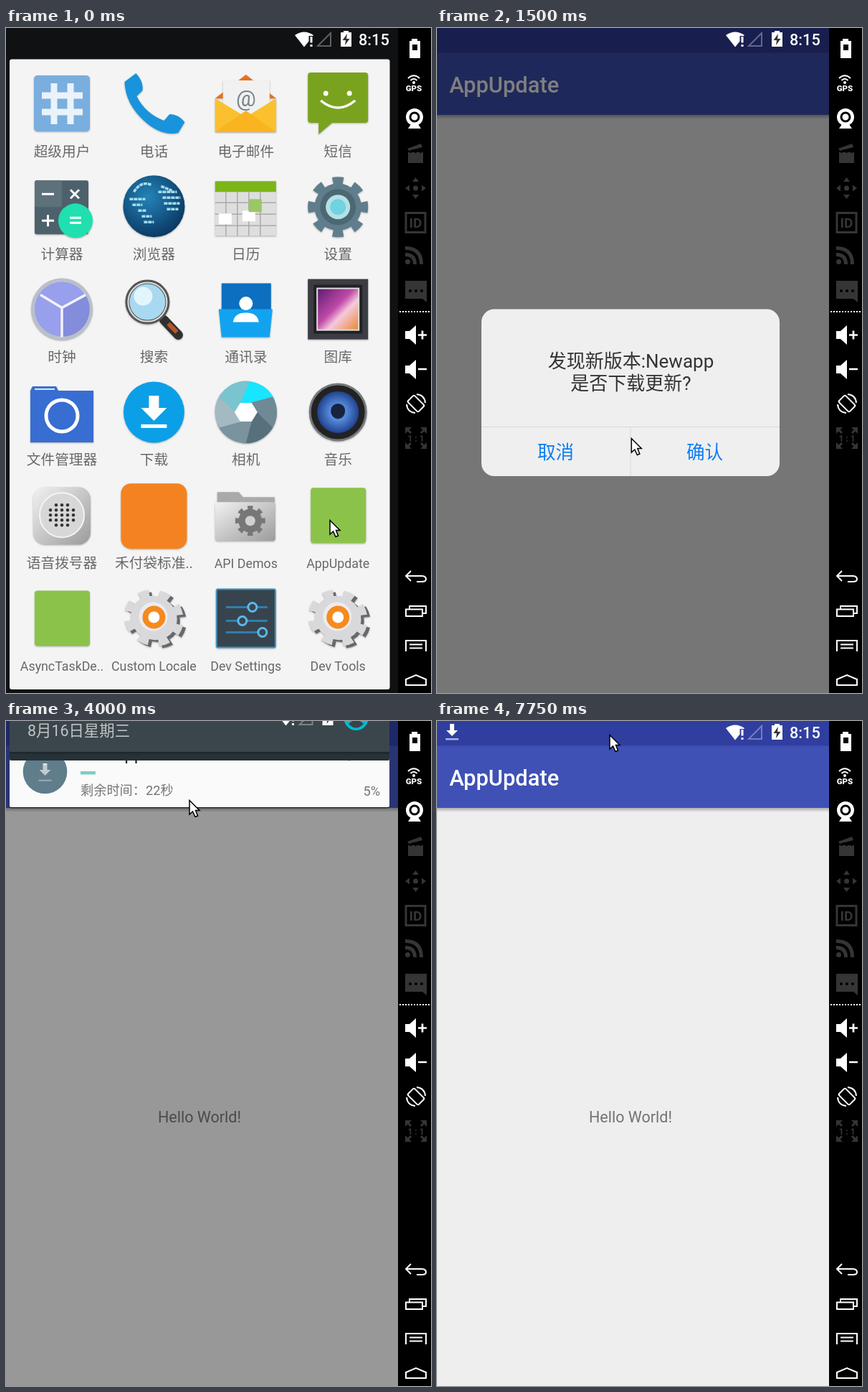
Recreate the animation shown at these times as an HTML page. Size 593 px wide and 926 px high, loop 8 s.

```html
<!DOCTYPE html>
<html lang="zh-CN">
<head>
<meta charset="utf-8">
<title>AppUpdate</title>
<style>
html, body { margin: 0; width: 100%; height: 100%; overflow: hidden; background: #000; }
svg { display: block; font-family: Roboto, 'Noto Sans CJK SC', 'Noto Sans CJK', sans-serif; }
.mid { text-anchor: middle; }
.end { text-anchor: end; }
.bold { font-weight: 500; }
.line { fill: none; stroke: #fff; stroke-width: 2; }
.off { fill: #353535; }
.offline { fill: none; stroke: #353535; stroke-width: 3; }
.thick { stroke-width: 5; }
.label { font-size: 19.7px; fill: #686868; text-anchor: middle; }
.latin { font-size: 17.8px; }
.icon { filter: drop-shadow(0 1px 1px rgba(0,0,0,.3)); }
#remaining { font-family: Roboto, 'Noto Sans CJK TC', 'Noto Sans CJK', sans-serif; }
</style>
</head>
<body>
<svg width="593" height="926" viewBox="0 0 593 926">
  <defs>
    <linearGradient id="fade" x2="0" y2="1"><stop stop-color="#000" stop-opacity=".28"/><stop offset="1" stop-color="#000" stop-opacity="0"/></linearGradient>
    <linearGradient id="metal" x2="1" y2="1"><stop stop-color="#f2f2f2"/><stop offset="1" stop-color="#9b9b9b"/></linearGradient>
    <linearGradient id="photo" x2="1" y2="1"><stop stop-color="#5b1a70"/><stop offset=".45" stop-color="#c04aa8"/><stop offset=".62" stop-color="#f6c9dc"/><stop offset="1" stop-color="#e8872c"/></linearGradient>
    <radialGradient id="globe" cx=".4" cy=".35" r=".7"><stop stop-color="#2384b8"/><stop offset="1" stop-color="#0a3560"/></radialGradient>
    <radialGradient id="cone"><stop stop-color="#111a30"/><stop offset=".3" stop-color="#1b2c58"/><stop offset=".35" stop-color="#5b8ee0"/><stop offset="1" stop-color="#20438f"/></radialGradient>
    <g id="statusIcons" fill="#fff">
      <path d="M403 10Q416 1 429 10L428 11H422.500V18.500L416 26.500Z"/>
      <path d="M424.500 12H427.500V20.500H424.500ZM424.500 23H427.500V26H424.500Z"/>
      <path d="M435 25H453V7Z" fill="none" stroke="#fff" stroke-opacity=".33" stroke-width="2"/>
      <path d="M471 4H478V6H482V26H467V6H471Z"/>
      <path d="M476 8L469.500 17H474L473 24L479.500 15H475Z" fill="#333"/>
    </g>
    <path id="arrow" d="M-3 -13H3V-4H8L0 4L-8 -4H-3Z"/>
    <clipPath id="screen"><rect width="547" height="926"/></clipPath>
  </defs>

  <g clip-path="url(#screen)">
    <rect width="547" height="926" fill="#101113"/>
    <g id="launcher">
      <rect x="5" y="43.500" width="530.500" height="877.500" rx="3" fill="#f4f4f4"/>
    </g>

    <g id="app">
      <rect width="547" height="926" fill="#eee"/>
      <rect y="121" width="547" height="6" fill="url(#fade)"/>
      <rect width="547" height="121" fill="#3f51b5"/>
      <rect width="547" height="34.500" fill="#303f9f"/>
      <text x="17.200" y="90" font-size="30.900" class="bold" fill="#fff">AppUpdate</text>
      <text x="270" y="559" font-size="21.500" class="mid" fill="#737373">Hello World!</text>
    </g>
    <rect id="dim" width="547" height="926"/>

    <g id="dialog">
      <rect x="62" y="391.500" width="416" height="232.500" rx="18" fill="#efefef"/>
      <path d="M62 555.500H478M270 555.500V624" stroke="#d8d8d8"/>
      <g class="mid" font-size="26" fill="#333">
        <text x="270.500" y="473">发现新版本:Newapp</text>
        <text x="270.500" y="504">是否下载更新?</text>
        <g font-size="25.600" fill="#0d7df5">
          <text x="165.500" y="600">取消</text>
          <text x="373.500" y="600">确认</text>
        </g>
      </g>
    </g>

    <use href="#statusIcons"/>
    <text x="492" y="24" font-size="21.700" class="bold" fill="#fff">8:15</text>
    <g id="download" fill="#fff">
      <use href="#arrow" x="21" y="17"/>
      <rect x="12" y="24" width="18" height="2.500" opacity=".6"/>
    </g>

    <rect id="scrim" width="547" height="926"/>
    <g id="card">
      <rect x="5" y="113" width="530" height="99" rx="3" fill="#000" opacity=".3"/>
      <rect x="5" y="111" width="530" height="99" rx="2" fill="#fafafa"/>
      <circle cx="54.500" cy="160.500" r="30.800" fill="#607d8b"/>
      <g id="noteIcon" fill="#fff"><use href="#arrow" x="54.500" y="162"/><rect x="45.500" y="171.500" width="18" height="2.500" opacity=".5"/></g>
      <rect x="52" y="149" width="5" height="2.500" fill="#dce4e8"/>
      <text x="103.500" y="144" font-size="24.300" fill="#212121">Newapp</text>
      <rect id="bar" x="104" y="160" height="4.500" fill="#80cbc4"/>
      <g font-size="18.200" fill="#757575">
        <text x="523" y="144" class="end">上午8:15</text>
        <text id="remaining" x="104" y="193"></text>
        <text id="percent" x="522" y="193.500" class="end"></text>
      </g>
    </g>
    <g id="header">
      <rect x="5" y="-20" width="530" height="120" rx="2" fill="#263238"/>
      <rect x="5" y="-20" width="530" height="108" rx="2" fill="#3b464c"/>
      <rect x="5" y="88" width="530" height="4" fill="url(#fade)"/>
      <text x="30.500" y="35" font-size="21.400" class="bold" fill="#fff">上午8:15</text>
      <text x="30" y="65.500" font-size="21.400" fill="#bfc4c6">8月16日星期三</text>
      <use href="#statusIcons" x="-25.500" y="25"/>
      <circle cx="488.500" cy="41" r="17" fill="#00bcd4"/>
      <circle cx="488.500" cy="35" r="5.300" fill="#37444b"/>
      <path d="M478 49Q488.500 39 499 49Q488.500 60 478 49Z" fill="#37444b"/>
    </g>
  </g>

  <g id="toolbar" fill="#fff">
    <rect x="547" width="46" height="926" fill="#000"/>
    <path d="M566 15H574V18H578V42H563V18H566Z"/><rect x="567" y="23" width="7" height="8" fill="#000"/>
    <circle cx="569" cy="76" r="2"/>
    <path class="line" d="M564.500 73Q569 68.500 573.500 73M561 70Q569 62.500 577 70"/>
    <text x="569" y="88" class="mid" font-size="11.500" font-weight="900">GPS</text>
    <circle cx="570" cy="124" r="12"/><circle cx="570" cy="124" r="6" fill="none" stroke="#000" stroke-width="3"/>
    <path d="M565 134H575L579 140H561Z"/>
    <g class="off">
      <path d="M561 173H582V188H561ZM560 168L579 161L581 166L562 171Z"/>
      <path d="M564 174L568 169M571 174L575 169M578 174L582 169" stroke="#000" stroke-width="2"/>
      <circle cx="571.500" cy="223" r="3.500"/>
      <path d="M571.500 208L576 214H567ZM571.500 238L576 232H567ZM557 223L563 218.500V227.500ZM586 223L580 218.500V227.500Z"/>
      <rect class="offline" x="558" y="257.500" width="27" height="27"/>
      <text x="571.500" y="278" class="mid" font-size="19" font-weight="700">ID</text>
      <circle cx="560.500" cy="325.500" r="3.500"/>
      <path class="offline thick" d="M557 315.500Q570.500 315.500 570.500 329M557 306.500Q579.500 306.500 579.500 329"/>
      <path d="M557 352H587V382L581 377H557Z"/>
    </g>
    <g fill="#000"><circle cx="564" cy="366" r="2"/><circle cx="572" cy="366" r="2"/><circle cx="580" cy="366" r="2"/></g>
    <path d="M549 395H593" stroke="#fff" stroke-width="2" stroke-dasharray="2 2"/>
    <path id="speaker" d="M557 422H563L572 414V441L563 433H557Z"/><use href="#speaker" y="48"/>
    <path d="M575 427.500H587M581 421.500V433.500M575 475H587" stroke="#fff" stroke-width="2.700"/>
    <g class="line" transform="translate(572 523)"><rect x="-6.500" y="-10.500" width="13" height="21" rx="2" transform="rotate(-45)"/><path d="M1 -13Q12 -12 13 -1M-1 13Q-12 12 -13 1"/></g>
    <g class="off">
      <path d="M557 556H566L557 565ZM587 556V565L578 556ZM557 586V577L566 586ZM587 586H578L587 577Z"/>
      <path class="offline" d="M559 558L565 564M585 558L579 564M559 584L565 578M585 584L579 578"/>
      <text x="572" y="575.500" class="mid" font-size="12" font-weight="700">1 : 1</text>
    </g>
    <g class="line">
      <path d="M565 756L558 763L565 770M558 763H580Q586 763 586 767.500Q586 771 580 771H573"/>
      <path d="M558 809.500H581V819H558ZM563 809V805H586V815H581"/>
      <path d="M558 868V853H586V868M563 858.500H581M563 863.500H581"/>
      <path d="M558 915V907L572 901L586 907V915Z"/>
    </g>
  </g>
  <path id="cursor" d="M0 .5V20L4.500 16L8 23.500L11.500 22L8.500 14.500H14Z" fill="#fff" stroke="#000" stroke-width="1.500"/>
</svg>

<script>
const $ = id => document.getElementById(id);
const circle = (x, y, r, fill, more = '') => `<circle cx="${x}" cy="${y}" r="${r}" fill="${fill}" ${more}/>`;
const rect = (x, y, w, h, fill, r = 0, more = '') => `<rect x="${x}" y="${y}" width="${w}" height="${h}" fill="${fill}" rx="${r}" ${more}/>`;
const path = (d, fill, more = '') => `<path d="${d}" fill="${fill}" ${more}/>`;
const line = (d, stroke, width, more = '') => path(d, 'none', `stroke="${stroke}" stroke-width="${width}" ${more}`);
const many = (n, f) => Array.from({ length: n }, (_, i) => f(i)).join('');
const gear = (x, y, r, n, fill) => circle(x, y, r * .78, fill) +
  circle(x, y, r * .83, 'none', `stroke="${fill}" stroke-width="${r * .34}" pathLength="${2 * n}" stroke-dasharray="1 1" transform="rotate(${-90 / n} ${x} ${y})"`);
const knob = (x, y) => line(`M-28 ${y}H30`, '#2f7fae', 3) + circle(x, y, 6, '#37474f', 'stroke="#5db7ea" stroke-width="3"');

const greenSquare = rect(-38, -38, 77, 77, '#8bc34a', 4);
const cogs = `<g transform="rotate(25) scale(1 .92)">${gear(5, 1, 42, 8, '#68686c')}${gear(0, 0, 42, 8, '#d9d9dc')}</g>` +
  circle(-1, -2, 20, '#ececee') + circle(0, -1, 12, '#fff', 'stroke="#f58a1f" stroke-width="8"');
const blades = ['#18e5ff', '#6f8a96', '#56707c', '#7a939e', '#a3bac3', '#79c4cf'];

const apps = [
  ['超级用户', rect(-39, -39, 78, 78, '#79aedf', 5) + line('M-11 -28V29M12 -28V29M-28 -11H29M-28 12H29', '#eaf2fa', 9)],
  ['电话', path('M-41 -30L-25 -42Q-14 -30 -16 -18L-24 -10Q-12 14 14 24L22 15Q34 15 43 26L34 41Q10 46 -14 24Q-40 0 -41 -30Z', '#1893dc')],
  ['电子邮件', path('M-43 -7L0 -40L42 -7Z', '#e8711c') + rect(-32, -32, 65, 50, '#f1f1f1') +
    `<text y="4" class="mid" font-size="31" fill="#78848c">@</text>` +
    path('M-43 -7L0 19L42 -7V40H-43Z', '#fbc02d') + path('M-43 40L0 10L42 40Z', '#f9b420')],
  ['短信', rect(-42, -43, 84, 70, '#79a31f', 4) + path('M-27 20H0L-27 43Z', '#79a31f') + circle(-17, -14, 3.5, '#fff') + circle(16, -14, 3.5, '#fff') + line('M-24 -4Q0 16 24 -4', '#fff', 3.5)],
  ['计算器', rect(-38, -36, 75, 75, '#4c616b', 3) + rect(-38, -36, 38, 37, '#5d717b', 3) + line('M-28 -17H-11M-28 20H-11M-19.500 12V28M12 -23L24 -11M24 -23L12 -11', '#fff', 3) +
    circle(19, 20, 24, '#1fe0ae') + line('M11 16H27M11 23H27', '#fff', 3)],
  ['浏览器', circle(0, 0, 43, 'url(#globe)') + line('M-28 -20Q-18 -36 -4 -30M-34 -10H-12M-30 -2H-16M-22 6H-10M-17 14H-3M-14 22H0M10 -28L25 -22M6 -20H32M12 -12H37M14 -4H36M18 4H34', '#a5dcee', 3.5, 'stroke-dasharray="5 1"')],
  ['日历', rect(-43, -33, 85, 74, '#dedede') + rect(-43, -35, 85, 15, '#7cb518') +
    line('M-43 -5H42M-43 11H42M-43 27H42M-28 -20V41M-12 -20V41M4 -20V41M20 -20V41', '#aaa', 1.5) +
    rect(-38, 10, 18, 15, '#fff') + rect(-5, 6, 18, 15, '#fff') + rect(4, -10, 18, 18, '#9bc764')],
  ['设置', gear(0, 1, 42, 8, '#607d8b') + circle(0, 1, 25, '#4b6873') + circle(0, 1, 17, '#b8dfe6') + circle(0, 1, 11, '#6fd3e0')],
  ['时钟', circle(0, 0, 43, '#b9c0ca') + circle(0, 0, 38, '#989fec') + path('M0 -2L33 -20A38 38 0 0 1 0 38Z', '#848cdc') + line('M-30 -20L0 -2L33 -20M0 -2V39', '#f2f3fb', 3.5)],
  ['搜索', line('M14 15L34 36', '#303030', 13, 'stroke-linecap="round"') + line('M20 20L32 32', '#b7542a', 6) + circle(-9, -10, 28, '#a8d9f0', 'stroke="#555" stroke-width="6"') + circle(-9, -10, 27, 'none', 'stroke="#ddd" stroke-width="2"') + circle(-15, -18, 13, '#e3f5fc')],
  ['通讯录', path('M-34 -36H35V2H-34Z', '#0d6fc0') + path('M-38 0H37L33 39H-34Z', '#12a3f0') + circle(0, -8, 9.5, '#fff') + path('M-18 18Q-16 5 0 5Q16 5 18 18Z', '#fff')],
  ['图库', rect(-42, -42, 84, 84, '#3b3c44') + rect(-34, -34, 68, 68, '#222') + rect(-29, -29, 58, 58, 'url(#photo)', 0, 'stroke="#ddd" stroke-width="2"')],
  ['文件管理器', path('M-41 -36H-8L-5 -30H44V42H-44V-30Z', '#386dd2') + rect(-38, -33, 28, 2, '#dde7fa') + circle(0, 5, 22, 'none', 'stroke="#fff" stroke-width="5"')],
  ['下载', circle(0, 0, 42.5, '#0b9fe8') + path('M-7 -23H7V-6H18L0 12L-18 -6H-7Z', '#fff') + rect(-18, 17, 36, 5, '#fff')],
  ['相机', circle(0, 0, 43, '#90a4ae') + many(6, i => path('M-8 -13L8 -13L40 -17A43 43 0 0 0 0 -43Z', blades[i], `transform="rotate(${i * 60})"`)) + path('M-8 -13H8L16 0L8 13H-8L-16 0Z', '#fff')],
  ['音乐', circle(0, 0, 39, '#222', 'stroke="#74777b" stroke-width="3"') + circle(0, 0, 29, 'url(#cone)') + circle(0, -2, 10, '#17233f')],
  ['语音拨号器', rect(-40, -39, 80, 80, 'url(#metal)', 17) + circle(0, 0, 31, '#d7d7d7', 'stroke="#f4f4f4" stroke-width="2"') +
    many(25, i => { const x = (i % 5 - 2) * 8, y = (Math.floor(i / 5) - 2) * 7; return Math.abs(x) + Math.abs(y) > 29 ? '' : circle(x, y, 2.2, '#333'); })],
  ['禾付袋标准..', rect(-46, -44, 92, 91, '#f58220', 14)],
  ['API Demos', path('M-40 -32H-10L-4 -25H40V35H-40Z', '#aaa') + rect(-43, -18, 84, 54, 'url(#metal)', 4) + gear(6, 8, 21, 8, '#777') + circle(6, 8, 7, '#d0d0d0')],
  ['AppUpdate', greenSquare],
  ['AsyncTaskDe..', greenSquare],
  ['Custom Locale', cogs],
  ['Dev Settings', rect(-41, -40, 82, 81, '#37444d', 2, 'stroke="#3d8fc2" stroke-width="2"') + knob(9, -15) + knob(-5, 4) + knob(23, 20)],
  ['Dev Tools', cogs],
];
$('launcher').innerHTML += apps.map(([name, art], i) => {
  const x = 78 + i % 4 * 128.4, y = 105 + Math.floor(i / 4) * 143.3;
  const latin = /^[A-Z]/.test(name);
  return `<g transform="translate(${x} ${y})"><g class="icon">${art}</g><text y="73.500" class="label ${latin ? 'latin' : ''}">${name}</text></g>`;
}).join('');

// Rows are [tick, values...]; values are linear between rows.
const TICK = 250, LOOP = 8000;
const tracks = {
  cursor: [[0, 452, 685], [2, 452, 685], [4, 227, 559], [5, 227, 559], [8, 360, 595], [10, 360, 595], [11, 356, 592], [14, 245, 15], [16, 256, 110], [18, 277, 270], [19, 279, 274], [24, 384, 486], [25, 373, 524], [26, 369, 518], [27, 350, 350], [28, 322, 170], [29, 290, 70], [31, 241, 19]],
  app: [[0, 0], [1, .6], [2, 1]],
  dialog: [[2, 0, 1], [3, 1, 1], [9, 1, 1], [10, .69, .966], [11, 0, .966]],
  dim: [[2, 0], [3, .5], [9, .5], [10, .546], [11, 0]],
  panel: [[14, -215], [15, -150], [16, -90], [17, -30], [18, 2], [25, 2], [26, 0], [27, -75], [28, -170], [29, -215]],
};
function at(track, tick) {
  const i = track.findIndex(row => row[0] > tick);
  if (i === 0) return track[0].slice(1);
  if (i < 0) return track[track.length - 1].slice(1);
  const a = track[i - 1], b = track[i], k = (tick - a[0]) / (b[0] - a[0]);
  return a.slice(1).map((v, j) => v + (b[j + 1] - v) * k);
}
const set = (id, attrs) => { for (const k in attrs) $(id).setAttribute(k, attrs[k]); };

function render(tick) {
  const value = name => at(tracks[name], tick);
  const [app] = value('app'), [alpha, scale] = value('dialog'), [dim] = value('dim'), [y] = value('panel');
  const visibility = y > -215 ? 'visible' : 'hidden';
  set('cursor', { transform: `translate(${value('cursor')})` });
  set('app', { opacity: app, transform: `translate(0 ${(1 - app) * 100})` });
  set('dialog', { opacity: alpha, transform: `translate(270 507.5) scale(${scale}) translate(-270 -507.5)` });
  set('dim', { opacity: dim });
  set('scrim', { opacity: .62 * Math.min(1, 1 + y / 215) });
  set('card', { transform: `translate(0 ${y})`, visibility });
  set('header', { transform: `translate(0 ${y / 2})`, visibility });
  set('download', { visibility: tick >= 10 ? 'visible' : 'hidden', opacity: [.6, 1, .35][tick % 3] });
  set('noteIcon', { opacity: [.3, .6, .3][tick % 3] });
  const [percent, seconds] = tick < 25 ? [5, 22] : [24, 9];
  set('bar', { width: percent * 4.18 });
  $('percent').textContent = percent + '%';
  $('remaining').textContent = `剩余时间：${seconds}秒`;
}

const start = performance.now();
let shown = -1;
function frame() {
  const tick = Math.floor((performance.now() - start) % LOOP / TICK);
  if (tick !== shown) render(shown = tick);
  requestAnimationFrame(frame);
}
frame();
</script>
</body>
</html>
```
